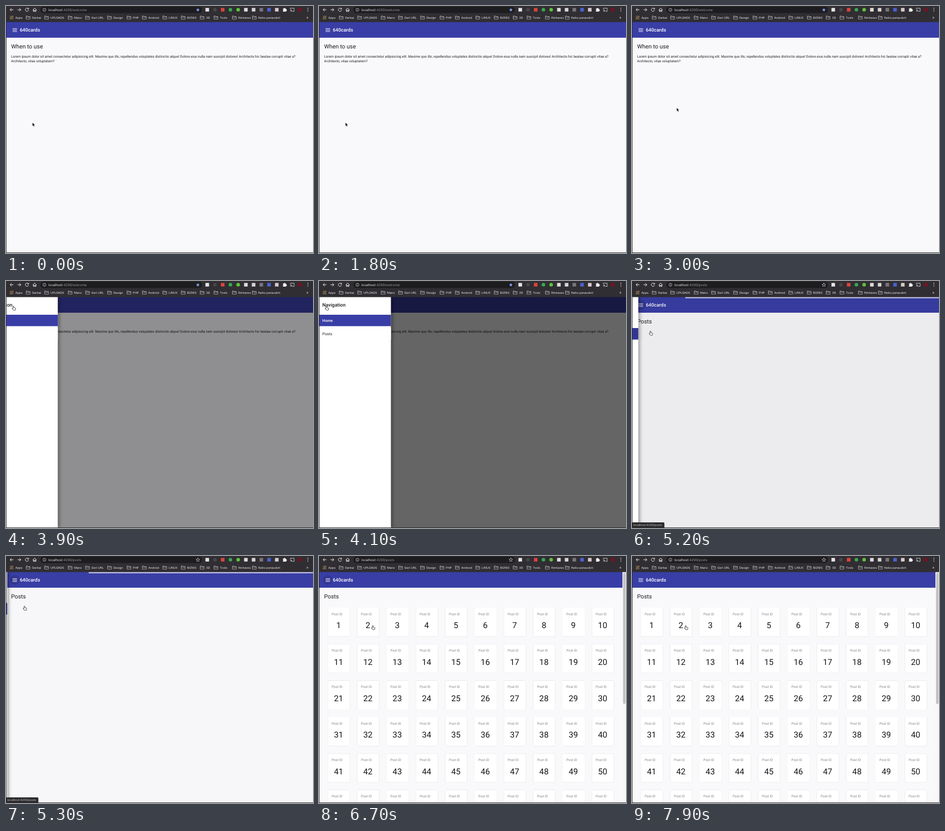
These frames come from a looping animation (600x483 px, 8 s). An HTML page:

```html
<!DOCTYPE html>
<html lang="en">
<head>
<meta charset="utf-8">
<title>Posts demo</title>
<style>
html, body { margin: 0; width: 100%; height: 100%; overflow: hidden; background: #f9f8fa; }
svg { display: block; width: 600px; height: 483px; font-family: Roboto, sans-serif; text-rendering: geometricPrecision; }
.ui { font-family: Inter, sans-serif; }
.med { font-weight: 500; }
.line { fill: none; stroke: #eee; stroke-width: 1; }
#cards rect { fill: #fff; filter: drop-shadow(0 .8px .6px rgba(0,0,0,.28)); }
#drawer { filter: drop-shadow(3px 0 3px rgba(0,0,0,.35)); }
</style>
</head>
<body>
<svg id="stage" viewBox="0 0 600 483"></svg>
<script>
const BLUE = '#393ea6';
const rect = (x, y, w, h, fill, more = '') =>
  `<rect x="${x}" y="${y}" width="${w}" height="${h}" fill="${fill}" ${more}/>`;
const text = (x, y, size, str, fill = '#1d1c1f', more = '') =>
  `<text x="${x}" y="${y}" font-size="${size}" fill="${fill}" ${more}>${str}</text>`;
const dot = (x, y, r, fill, more = '') => `<circle cx="${x}" cy="${y}" r="${r}" fill="${fill}" ${more}/>`;
const line = (d, more = '') => `<path class="line" d="${d}" ${more}/>`;
const range = n => [...Array(n).keys()];

function star(cx, cy, r) {
  return range(10).map(i => {
    const a = Math.PI * (i / 5 - .5), q = i % 2 ? r * .42 : r;
    return (cx + q * Math.cos(a)).toFixed(2) + ',' + (cy + q * Math.sin(a)).toFixed(2);
  }).join(' ');
}

function card(i) {
  const x = 17.2 + i % 10 * 57.35, y = 101 + Math.floor(i / 10) * 71.3;
  return rect(x, y, 43, 56.5, '#fff', 'rx="1.6"') +
    text(x + 7.5, y + 14.6, 6.6, 'Post ID', '#858488') +
    text(x + 21, y + 40.3, 16.1, i + 1, '#161518', 'text-anchor="middle"');
}

const page = `
  ${rect(0, 31, 600, 452, '#f9f8fa')}
  ${rect(0, 31, 600, 31, BLUE)}
  ${dot(17, 47, 9.4, '#000', 'id="focus" opacity=".12"')}
  ${line('M12.8 44.3h8.8M12.8 47.1h8.8M12.8 49.9h8.8', 'style="stroke:#fff"')}
  ${text(27, 50.2, 9.43, '640cards', '#fff', 'class="med"')}
  <g id="welcome">
    ${text(10, 82.5, 11.31, 'When to use')}
    ${text(10, 101, 6.6, 'Lorem ipsum dolor sit amet consectetur adipisicing elit. Maxime quo illo, repellendus voluptates distinctio atque! Dolore eius nulla nam suscipit dolores! Architecto hic beatae corrupti vitae a?')}
    ${text(10, 110.4, 6.6, 'Architecto, vitae voluptatem?')}
  </g>
  <g id="posts">
    ${text(10, 82.5, 11.31, 'Posts')}
    ${rect(0, 31, 600, 2.8, '#c9cbee', 'id="progress"')}
    <g id="cards">
      ${range(60).map(card).join('')}
      <path d="M593 31h7v452h-7z" fill="#f7f6f8"/>
      <path d="M594.3 35.5a2.4 2.4 0 0 1 4.8 0V287a2.4 2.4 0 0 1-4.8 0z" fill="#c1c0c3"/>
    </g>
  </g>`;

const drawer = `
  ${rect(0, 31, 600, 452, '#000', 'id="shade"')}
  <g id="drawer">
    ${rect(0, 31, 142, 452, '#fff')}
    ${text(8, 50.2, 9.43, 'Navigation', '#1d1c1f', 'class="med"')}
    ${rect(0, 66, 142, 22.3, BLUE, 'id="homeRow"')}
    ${rect(0, 92, 142, 22.5, '#f3f3f4', 'id="postsRow"')}
    <clipPath id="row"><path d="M0 92h142v22.5H0z"/></clipPath>
    <g clip-path="url(#row)">${dot(37, 102, 0, '#000', 'id="ripple" opacity=".12"')}</g>
    ${text(8, 79.6, 7.54, 'Home', '#fff', 'id="homeText" class="med"')}
    ${text(8, 105.8, 7.54, 'Posts', '#222', 'id="postsText"')}
  </g>`;

const folders = [[51, 'Darbai'], [87, 'UPLOADS'], [133, 'Mano'], [167, 'Geri URL'], [210, 'Design'],
  [248, 'PHP'], [278, 'Android'], [318, 'LINUX'], [354, 'BIZNIS'], [391, '3D'], [418, 'Tools'],
  [454, 'Rimtaves'], [493, 'Reiks panaudoti']];
const folder = ([x, name]) =>
  line(`M${x - 11.5} 19.5h3l1 1.2h3.6v5h-7.6zM${x - 11.5} 21.8h7.6`, 'style="stroke:#bbb;stroke-width:.8"') +
  text(x, 24.7, 5.7, name, '#e8e8ea');

const extensions = ['#e4e4e6', '#47464a', '#d9443c', '#35a853', '#5fc33c', '#dcdcde', '#d5d5d7',
  '#77767a', '#4a63d0', '#d8c9cb'];
const extension = (fill, i) => {
  const x = 393.3 + i * 15.1;
  return [1, 3, 4].includes(i) ? dot(x, 7.3, 3.5, fill) : rect(x - 3.5, 3.8, 7, 7, fill);
};

const chrome = `
  <g class="ui">
    ${rect(0, 0, 600, 31.5, '#302e32')}
    ${line('M14.5 7.3H8M11 4.2L7.9 7.3l3.1 3.1M22.5 7.3H29M26 4.2l3.1 3.1-3.1 3.1')}
    ${line('M43.6 5.4a3.2 3.2 0 1 0 .5 2.7M44.2 3.7v2.4h-2.5')}
    ${line('M52.4 7.5L56 4l3.6 3.5M53.5 7v3.7h1.7V8.2h1.6v2.5h1.7V7')}
    ${rect(67, 1, 316, 12.8, '#1d1c1f', 'rx="6.4"')}
    ${dot(75, 7.4, 3, 'none', 'stroke="#ccc" stroke-width=".8"')}
    ${line('M75 7v2.2M75 5.4v.8', 'style="stroke:#ccc;stroke-width:.8"')}
    <text x="83" y="9.8" font-size="6.4" fill="#f0f0f2">localhost<tspan id="path" fill="#9b9a9e"></tspan></text>
    <polygon id="star" points="${star(375, 7.6, 3.9)}" stroke-width=".8"/>
    ${extensions.map(extension).join('')}
    <path d="M541.2 5h2a1.2 1.2 0 1 1 2.3 0h2v2a1.2 1.2 0 1 1 0 2.3v1.8h-6.3V9a1.2 1.2 0 0 0 0-2.2z" fill="#eee"/>
    ${line('M555.7 6V4.3h7.4v6.3h-3M555.7 10.6h.8M555.7 8.7a2 2 0 0 1 2 2M555.7 7.2a3.5 3.5 0 0 1 3.5 3.5', 'style="stroke-width:.8"')}
    ${dot(574, 7.2, 4, '#701523')}
    ${range(3).map(i => dot(590, 4.4 + i * 2.9, .8, '#eee')).join('')}
    ${range(9).map(i => rect(7.8 + i % 3 * 2.4, 19.4 + Math.floor(i / 3) * 2.4, 1.6, 1.6,
      ['#d9605a', '#58a765', '#d8a94c'][(i + Math.floor(i / 3)) % 3])).join('')}
    ${text(18.3, 24.7, 5.7, 'Apps', '#e8e8ea')}
    ${folders.map(folder).join('')}
    ${text(587, 24.7, 7, '»', '#e8e8ea')}
    <path d="M.4 31.5V483M0 482.5h600" stroke="#28272a" fill="none"/>
    <g id="status">
      <path id="statusBox" fill="#2b2a2d"/>
      <text id="statusText" x="2.6" y="479.3" font-size="5.6" fill="#c4c4c7"></text>
    </g>
  </g>
  <path id="arrow" d="M0 0v7l1.6-1.5L2.8 8.2l1.2-.5-1.1-2.6h2.2z" fill="#000" stroke="#fff" stroke-width=".5"/>
  <path id="hand" d="M-.9 1Q-.9 0 0 0T.9 1V3l2.7.6q.9.3.7 1.4L3.7 8H-.2L-2.6 5q0-1.2 1.7 0z"
    fill="#fff" stroke="#111" stroke-width=".75"/>`;

const stage = document.getElementById('stage');
stage.innerHTML = page + drawer + chrome;
const el = {};
stage.querySelectorAll('[id]').forEach(e => el[e.id] = e);
const set = (id, attrs) => { for (const k in attrs) el[id].setAttribute(k, attrs[k]); };
const show = (id, on) => { el[id].style.display = on ? '' : 'none'; };
const clamp = v => Math.min(1, Math.max(0, v));

function bezier(p, x1, y1, x2, y2) {
  if (p <= 0 || p >= 1) return clamp(p);
  const at = (s, a, b) => 3 * (1 - s) ** 2 * s * a + 3 * (1 - s) * s * s * b + s ** 3;
  let lo = 0, hi = 1;
  for (let i = 0; i < 24; i++) {
    const mid = (lo + hi) / 2;
    if (at(mid, x1, x2) < p) lo = mid; else hi = mid;
  }
  return at(lo, y1, y2);
}
const slide = (t, start) => bezier((t - start) / 400, .25, .8, .25, 1);

// pointer stops: time, x, y
const stops = [[0, 51.7, 228], [1800, 51.7, 228], [2600, 90, 214], [3000, 87.3, 199], [3500, 14.5, 49],
  [4250, 14.5, 49], [4800, 36, 98], [5400, 36, 98], [6000, 98, 140], [6300, 98, 140],
  [6650, 105, 136], [8000, 105, 136]];
function pointer(t) {
  const i = stops.findIndex(s => s[0] > t), [t0, x0, y0] = stops[i - 1], [t1, x1, y1] = stops[i];
  const p = (t - t0) / (t1 - t0), e = p * p * (3 - 2 * p);
  return [x0 + (x1 - x0) * e, y0 + (y1 - y0) * e];
}

const OPEN = 3800, CLICK = 4960, NAV = 5020, LOADED = 5600;

function draw(t) {
  const onPosts = t >= NAV, loaded = t >= LOADED;
  show('welcome', !onPosts);
  show('posts', onPosts);
  show('cards', loaded);
  show('progress', !loaded);
  const edge = Math.max(0, (t - NAV) * .575);
  set('progress', { x: edge, width: Math.max(0, 600 - edge) });
  show('focus', onPosts && t < 7000);

  const open = onPosts ? 1 - slide(t, NAV) : slide(t, OPEN);
  show('drawer', open > 0);
  set('drawer', { transform: `translate(${142 * (open - 1)} 0)` });
  set('shade', { opacity: .6 * open });

  const [x, y] = pointer(t), hand = t > 3420;
  const overHome = open > .9 && y > 66 && y < 88, overPosts = open > .9 && y > 92;
  set('homeRow', { fill: onPosts ? '#fff' : BLUE });
  set('homeText', { fill: onPosts ? '#222' : '#fff' });
  set('postsRow', { fill: onPosts ? BLUE : overPosts ? '#f3f3f4' : '#fff' });
  set('postsText', { fill: onPosts ? '#fff' : '#222' });
  set('ripple', { r: 105 * bezier((t - CLICK) / 225, 0, 0, .2, 1) });

  el.path.textContent = onPosts ? ':4200/posts' : ':4200/welcome';
  set('star', onPosts ? { fill: 'none', stroke: '#c8c8cb' } : { fill: '#83a9f2', stroke: 'none' });
  show('status', overHome || overPosts || (onPosts && !loaded));
  el.statusText.textContent = 'localhost:4200/' + (overHome ? 'welcome' : 'posts');
  set('statusBox', { d: `M0 472h${overHome ? 69 : 61.5}q1.8 0 1.8 1.8V483H0z` });

  show('arrow', !hand);
  show('hand', hand);
  set(hand ? 'hand' : 'arrow', { transform: `translate(${x} ${y})` });
}

function tick() {
  draw(performance.now() % 8000);
  requestAnimationFrame(tick);
}
tick();
</script>
</body>
</html>
```
